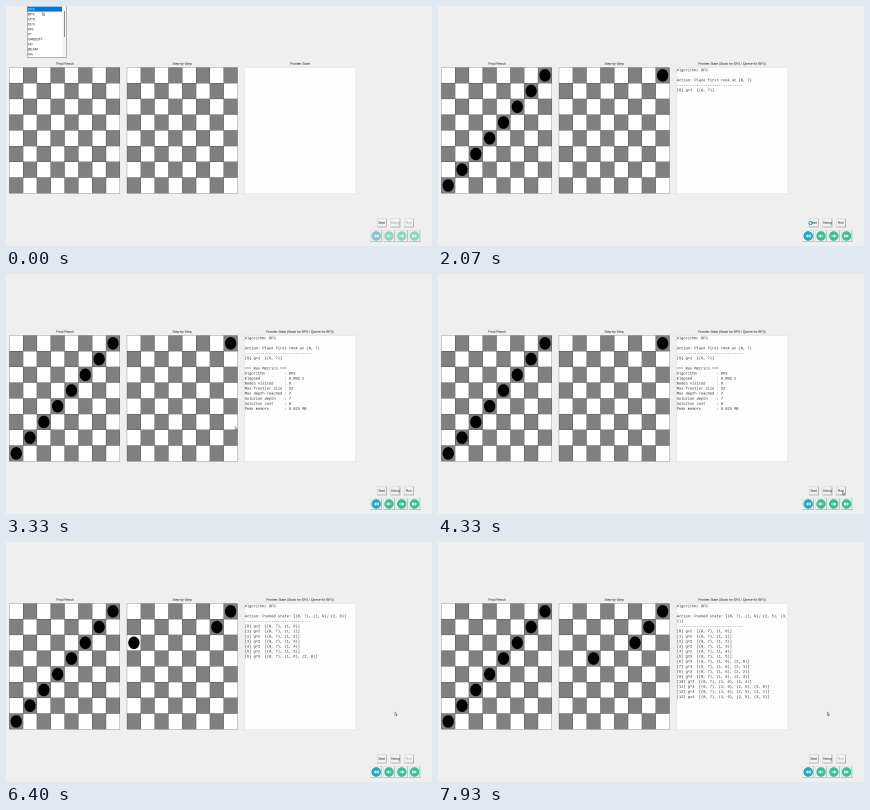
An HTML page with a canvas for the animation above (8000 ms loop, 426 px wide and 240 px high).

```html
<!DOCTYPE html>
<html lang="en">
<head>
<meta charset="utf-8">
<title>Rook search</title>
<style>
html, body { margin: 0; width: 100%; height: 100%; overflow: hidden; background: #efefef; }
canvas { display: block; }
</style>
</head>
<body>
<canvas id="stage" width="426" height="240"></canvas>
<script>
// the scene is painted enlarged, then scaled down so tiny text and hairlines stay even
const W = 426, H = 240, ZOOM = 4;
const screen = document.getElementById('stage').getContext('2d');
screen.imageSmoothingQuality = 'high';
const scene = document.createElement('canvas');
scene.width = W * ZOOM;
scene.height = H * ZOOM;
const ctx = scene.getContext('2d');
ctx.scale(ZOOM, ZOOM);

const SANS = '"Liberation Sans", Arial, sans-serif';
const UI = '"Open Sans", sans-serif';
const MONO = '"Liberation Mono", "Courier New", monospace';
const LOOP = 8000, STEP = 195;
const START = 1530, DIALOG_IN = 2400, DIALOG_OUT = 3320, RUN = 4460, PUSH = 4925;

const METRICS = ['=== Run Metrics ===', ...[
  ['Algorithm', 'DFS'], ['Elapsed', '0.002 s'], ['Nodes visited', 8],
  ['Max frontier size', 22], ['Max depth reached', 7], ['Solution depth', 7],
  ['Solution cost', 0], ['Peak memory', '0.025 MB']
].map(([k, v]) => k.padEnd(18) + ': ' + v)];

// pointer keys: time, x, y
const POINTER = [[0, 36.5, 6], [400, 36.5, 5], [1200, 372.5, 217], [2450, 372.5, 217],
  [2860, 229, 152.3], [3400, 229, 152.3], [4260, 404.5, 217.5], [4550, 404.5, 217.5],
  [4920, 388.7, 170], [8000, 389.2, 170]];

// depth-first search: one step for every pushed state
const steps = [];
const stack = [];
for (let state = [7]; state.length < 4; state = stack.pop()) {
  for (let c = 0; c < 8; c++) {
    if (state.includes(c)) continue;
    stack.push([...state, c]);
    steps.push([...stack]);
  }
}

function rect(x, y, w, h, fill, stroke, line = 0.5) {
  if (fill) { ctx.fillStyle = fill; ctx.fillRect(x, y, w, h); }
  if (stroke) { ctx.strokeStyle = stroke; ctx.lineWidth = line; ctx.strokeRect(x, y, w, h); }
}

function oval(x, y, rx, ry, fill) {
  ctx.fillStyle = fill;
  ctx.beginPath();
  ctx.ellipse(x, y, rx, ry, 0, 0, 7);
  ctx.fill();
}

function path(points, fill, stroke, line) {
  ctx.beginPath();
  points.forEach(([x, y]) => ctx.lineTo(x, y));
  if (fill) { ctx.closePath(); ctx.fillStyle = fill; ctx.fill(); }
  if (stroke) { ctx.strokeStyle = stroke; ctx.lineWidth = line; ctx.stroke(); }
}

// a large font scaled down keeps exact letter spacing
function text(str, x, y, size, family, color = '#111', align = 'left') {
  ctx.save();
  ctx.translate(x, y);
  ctx.scale(0.1, 0.1);
  ctx.font = `${size * 10}px ${family}`;
  ctx.textAlign = align;
  ctx.textBaseline = 'middle';
  ctx.fillStyle = color;
  ctx.fillText(str, 0, 0);
  ctx.restore();
}

function board(x0, cols) {
  const w = 13.82, h = 15.72, y0 = 61.5;
  for (let r = 0; r < 8; r++)
    for (let c = 0; c < 8; c++)
      rect(x0 + c * w, y0 + r * h, w, h, (r + c) % 2 ? '#808080' : '#fff', '#222', 0.22);
  cols.forEach((c, r) => oval(x0 + (c + 0.5) * w, y0 + (r + 0.5) * h, 5.65, 6.3, '#000'));
}

const tuples = s => '[' + s.map((c, r) => `(${r}, ${c})`).join(', ') + ']';

function wrap(line) {
  if (line.length <= 50) return [line];
  const cut = line.lastIndexOf(' ', 50);
  return [line.slice(0, cut), line.slice(cut + 1)];
}

function frontier(t) {
  rect(238.3, 61.5, 111.6, 126.3, '#fdfdfd', '#d4d4d4', 0.4);
  if (t < START) return;
  const pushed = t >= PUSH;
  const list = pushed ? steps[Math.floor((t - PUSH) / STEP)] : [[7]];
  const action = pushed ? 'Pushed state: ' + tuples(list[list.length - 1])
                        : 'Place first rook at (0, 7)';
  const lines = ['Algorithm: DFS', '', ...wrap('Action: ' + action), '-'.repeat(30),
    ...list.map((s, i) => `[${i}] g=${s.length}  ${tuples(s)}`)];
  if (t >= DIALOG_OUT && !pushed) lines.push('', ...METRICS);
  lines.forEach((s, i) => text(s, 238.7, 64.2 + i * 5.04, 3.68, MONO, '#222'));
}

function button(label, x, enabled) {
  rect(x - 4.6, 212.6, 9.2, 8.4, '#f1f1f1', '#ccc', 0.4);
  path([[x - 4.6, 221], [x + 4.6, 221], [x + 4.6, 212.6]], null, '#777', 0.45);
  text(label, x, 216.9, 3.2, SANS, enabled ? '#111' : '#999', 'center');
}

function arrowIcon(x, dir, double, color, enabled) {
  const y = 230;
  rect(x - 5.4, 224.3, 10.8, 11.4, '#f2f2f2', '#d0d0d0', 0.4);
  path([[x - 5.4, 235.7], [x + 5.4, 235.7], [x + 5.4, 224.3]], null, '#888', 0.45);
  ctx.globalAlpha = enabled ? 1 : 0.55;
  oval(x, y, 4.7, 4.8, color);
  ctx.globalAlpha = 1;
  const head = a => path([[a - dir * 1.2, y - 1.9], [a + dir * 1.2, y], [a - dir * 1.2, y + 1.9]], '#fff');
  if (double) { head(x - 1.2); head(x + 1.2); return; }
  head(x + dir * 1.3);
  path([[x - 2.4, y], [x + 2.2, y]], null, '#fff', 0.9);
}

function dropdown() {
  rect(21.3, -1, 39.4, 52.2, '#fff', '#555', 0.4);
  rect(21.6, 0.6, 34.4, 5, '#0078d7');
  ['DFS', 'BFS', 'UCS', 'DLS', 'IDS', 'A*', 'GREEDY', 'HC', 'BEAM', 'GA'].forEach((s, i) =>
    text(s, 22, 3.2 + i * 5.02, 3.4, SANS, i ? '#111' : '#fff'));
  rect(56.5, 0, 3.8, 51, '#f4f4f4');
  rect(58, 5, 0.8, 26, '#777');
}

function dialog(t) {
  const grow = Math.min(1, (t - DIALOG_IN) / 130);
  const s = 0.9 + 0.1 * grow;
  ctx.save();
  ctx.globalAlpha = 0.3 + 0.7 * grow;
  ctx.translate(215, 120.5);
  ctx.scale(s, s);
  ctx.translate(-215, -120.5);
  ctx.shadowColor = 'rgba(0,0,0,.45)';
  ctx.shadowBlur = 10 * ZOOM;
  ctx.shadowOffsetX = 1.5 * ZOOM;
  ctx.shadowOffsetY = 3 * ZOOM;
  rect(182.6, 84, 64.8, 73.5, '#fff');
  ctx.shadowColor = 'transparent';
  rect(182.6, 84, 64.8, 9.6, '#c40f24');
  rect(182.6, 146, 64.8, 11.5, '#f0f0f0');
  rect(182.6, 84, 64.8, 73.5, null, '#b01525', 0.3);
  text('Run Metrics', 190.5, 89, 3.2, UI, '#fff');
  path([[241.5, 88], [243.3, 89.8]], null, '#fff', 0.3);
  path([[243.3, 88], [241.5, 89.8]], null, '#fff', 0.3);
  oval(193.3, 105.5, 4.8, 4.8, '#1a84d0');
  rect(192.8, 104.7, 1, 3.4, '#fff');
  oval(193.3, 103.1, 0.6, 0.6, '#fff');
  METRICS.forEach((line, i) => text(line, 200.2, 103 + i * 4.06, 3, UI, '#111'));
  rect(222.4, 148.4, 20.2, 6.4, '#e5f1fb', '#0078d7', 0.3);
  text('OK', 232.7, 151.6, 3.1, UI, '#111', 'center');
  ctx.restore();
}

function pointer(t) {
  const i = POINTER.findIndex(k => k[0] > t);
  const [t0, x0, y0] = POINTER[i - 1], [t1, x1, y1] = POINTER[i];
  const u = (t - t0) / (t1 - t0), e = u * u * (3 - 2 * u);
  const x = x0 + (x1 - x0) * e, y = y0 + (y1 - y0) * e;
  if (t >= 1250 && t < DIALOG_IN) {
    oval(x, y, 2, 2.2, '#2a9fd0');
    oval(x, y, 1, 1.2, '#d8f2fb');
    return;
  }
  path([[0, 0], [0, 3.4], [0.8, 2.7], [1.4, 4], [1.9, 3.7], [1.4, 2.5], [2.4, 2.4]]
    .map(([a, b]) => [x + a, y + b]), '#fff', '#222', 0.3);
}

function draw(t) {
  const ready = t >= START;
  rect(0, 0, W, H, '#efefef');
  text('Final Result', 59, 57.8, 3.3, SANS, '#111', 'center');
  text('Step-by-Step', 176, 57.8, 3.3, SANS, '#111', 'center');
  text('Frontier State' + (ready ? ' (Stack for DFS / Queue for BFS)' : ''),
    294, 57.8, 3.25, SANS, '#111', 'center');

  board(3.3, ready ? [7, 6, 5, 4, 3, 2, 1, 0] : []);
  const shown = t - PUSH - 60;
  const list = shown >= 0 ? steps[Math.floor(shown / STEP)] : [[7]];
  board(121, ready ? list[list.length - 1] : []);
  frontier(t);

  button('Start', 375.7, true);
  button('Doing', 389.4, ready);
  button('Run', 402.8, ready && t < RUN);
  arrowIcon(370.2, -1, true, '#22a5c4', ready);
  arrowIcon(383, -1, false, '#35c297', ready);
  arrowIcon(395.8, 1, false, '#35c297', ready);
  arrowIcon(408.5, 1, true, '#35c297', ready);

  if (t < 130) dropdown();
  if (t >= DIALOG_IN && t < DIALOG_OUT) dialog(t);
  pointer(t);
  screen.drawImage(scene, 0, 0, W, H);
}

const origin = performance.now();
function tick() {
  draw((performance.now() - origin) % LOOP);
  requestAnimationFrame(tick);
}
tick();
</script>
</body>
</html>
```
